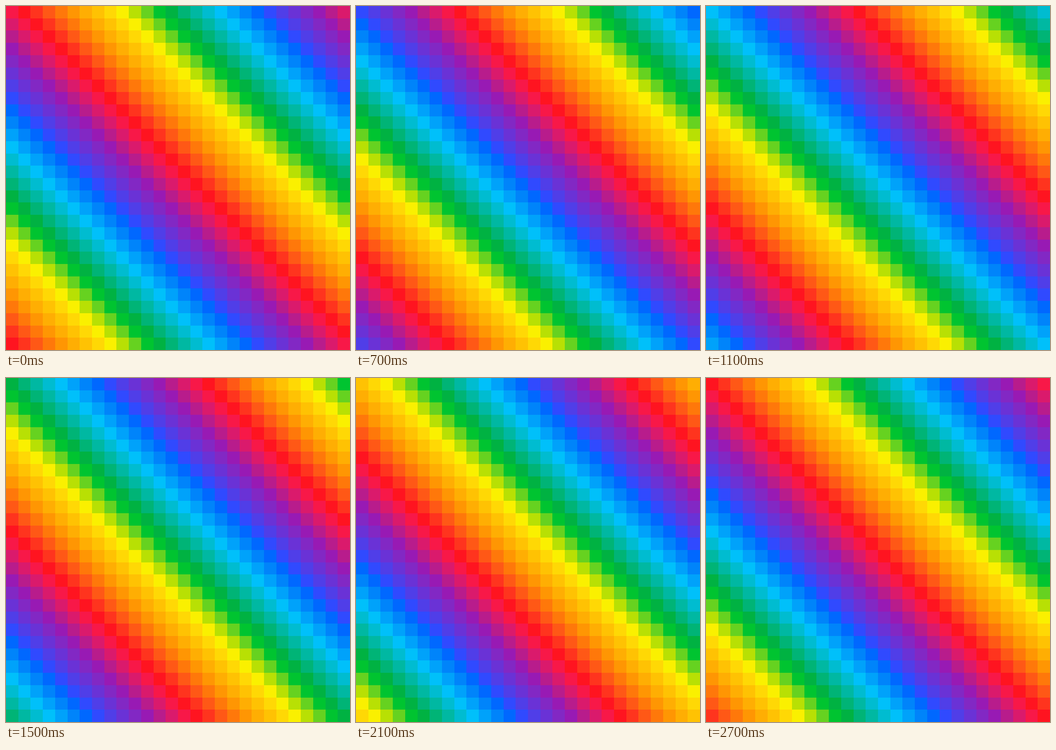
An HTML page with a canvas that plays this animation: 748 px wide and 748 px high, repeating every 2.8 s.

```html
<!DOCTYPE html>
<html lang="en">
<head>
<meta charset="utf-8">
<title>Rainbow steps</title>
<style>
  html, body { margin: 0; width: 100%; height: 100%; overflow: hidden; }
  canvas { display: block; }
</style>
</head>
<body>
<canvas id="stage" width="748" height="748"></canvas>
<script>
const SIZE = 748;
const STEP_MS = 100;
const palette = `
  ff1420 ff341e ff5816 ff780a ff9603 ffae03 ffc203 ffd805
  faf000 b8e004 66d220 00c430 00b242 00b476 00b8a2 00bcd0
  00c0fa 00a2fa 0084fa 0068ff 304aff 503ee8 6a32d6 8228c4
  981ab4 b81c8c da1a6c f81848`.trim().split(/\s+/).map(hex => '#' + hex);
const N = palette.length;
const ctx = document.getElementById('stage').getContext('2d', { alpha: false });
const edge = i => Math.round(i * SIZE / N);
let shown = -1;

// The colour depends only on the diagonal, which moves one cell right per step.
function draw(step) {
  for (let row = 0; row < N; row++) {
    for (let col = 0; col < N; col++) {
      const x = edge(col), y = edge(row);
      ctx.fillStyle = palette[(col - row - step - 1 + 3 * N) % N];
      ctx.fillRect(x, y, edge(col + 1) - x, edge(row + 1) - y);
    }
  }
}

function tick() {
  const step = Math.floor(performance.now() / STEP_MS) % N;
  if (step !== shown) draw(shown = step);
  requestAnimationFrame(tick);
}
tick();
</script>
</body>
</html>
```
